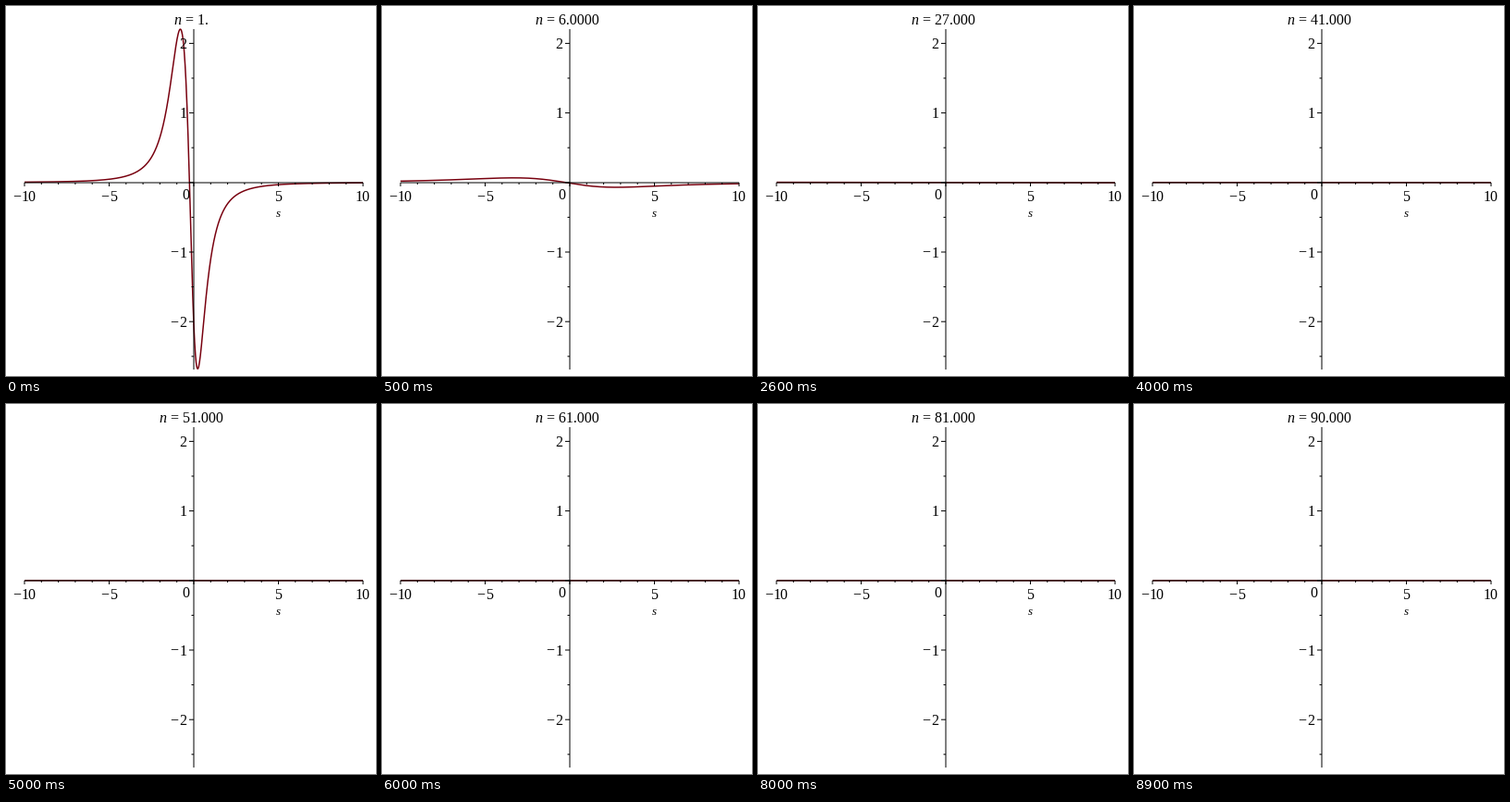
Write a matplotlib script that moves like this. It is 400 px wide and 400 px high and loops after 9000 ms.

```python
import numpy as np
import matplotlib.pyplot as plt
from matplotlib.animation import FuncAnimation

SIZE, DPI = 400, 100
FRAMES, INTERVAL = 90, 100
X0, Y0 = 203, 190.8          # origin in pixels
UX, UY = 18.3, 75.2          # pixels per unit
FONT = "Liberation Serif"


def px(size):
    """Pixels to points."""
    return size * 72 / DPI


fig = plt.figure(figsize=(SIZE / DPI, SIZE / DPI), dpi=DPI, facecolor="white")
ax = fig.add_axes([0, 0, 1, 1])
ax.set_xlim(0, SIZE)
ax.set_ylim(SIZE, 0)
ax.axis("off")


def label(x, y, text, ha="left", size=16, style="normal"):
    return ax.text(x, y, text, ha=ha, va="baseline", fontsize=px(size),
                   family=FONT, style=style, color="black", zorder=4)


def number(right, y, v):
    """Right-aligned integer with a small gap after the minus sign."""
    digits = str(abs(v))
    label(right, y, digits, ha="right")
    if v < 0:
        label(right - 8 * len(digits) - 1, y, "\u2212", ha="right")


def stroke(xs, ys):
    ax.plot(xs, ys, color="black", lw=px(1), solid_capstyle="butt",
            snap=False, zorder=3)


def draw_axes():
    stroke([20, 386], [191, 191])
    stroke([X0, X0], [25, 393])
    for v in range(-10, 11):
        x = X0 + UX * v
        stroke([x, x], [191, 195 if v % 5 == 0 else 193])
        if v % 5 == 0 and v:
            half = 4 * len(str(abs(v)))
            number(x + half + (5 if v < 0 else -0.7), 211, v)
    for half in range(-5, 5):
        y = Y0 - UY * half / 2
        stroke([198 if half % 2 == 0 else 200.5, X0], [y, y])
        if half % 2 == 0 and half:
            number(195.3, y + 5.5, half // 2)
    label(194, 209, "0", ha="center")
    label(294.5, 228, "s", ha="center", size=13, style="italic")


def response(s, n):
    """Skewed Lorentzian slope that widens as n and fades as 1/n^2."""
    t = (s + 0.255) / n
    d = t * t + 0.766
    odd = 5.03 * t / d**2
    skew = t * t * (1.4 - 1.5 * t * t) / d**4
    return -(odd + skew / n) / n**2


draw_axes()
s = np.linspace(-10, 10, 1601)
curve, = ax.plot([], [], color="#78000e", lw=px(1.5),
                 solid_capstyle="butt", snap=False, zorder=2)
var = label(0, 20, "n", style="italic")
value = label(0, 20, "")


def update(i):
    n = i + 1
    text = "1." if n == 1 else f"{n:.{5 - len(str(n))}f}"
    left = 181.5 if n == 1 else 165.5
    var.set_x(left)
    value.set_x(left + 12.5)
    value.set_text("= " + text)
    curve.set_data(X0 + UX * s, Y0 - UY * response(s, n))
    return curve, var, value


anim = FuncAnimation(fig, update, frames=FRAMES, interval=INTERVAL,
                     repeat=True, repeat_delay=0)
plt.show()
```
